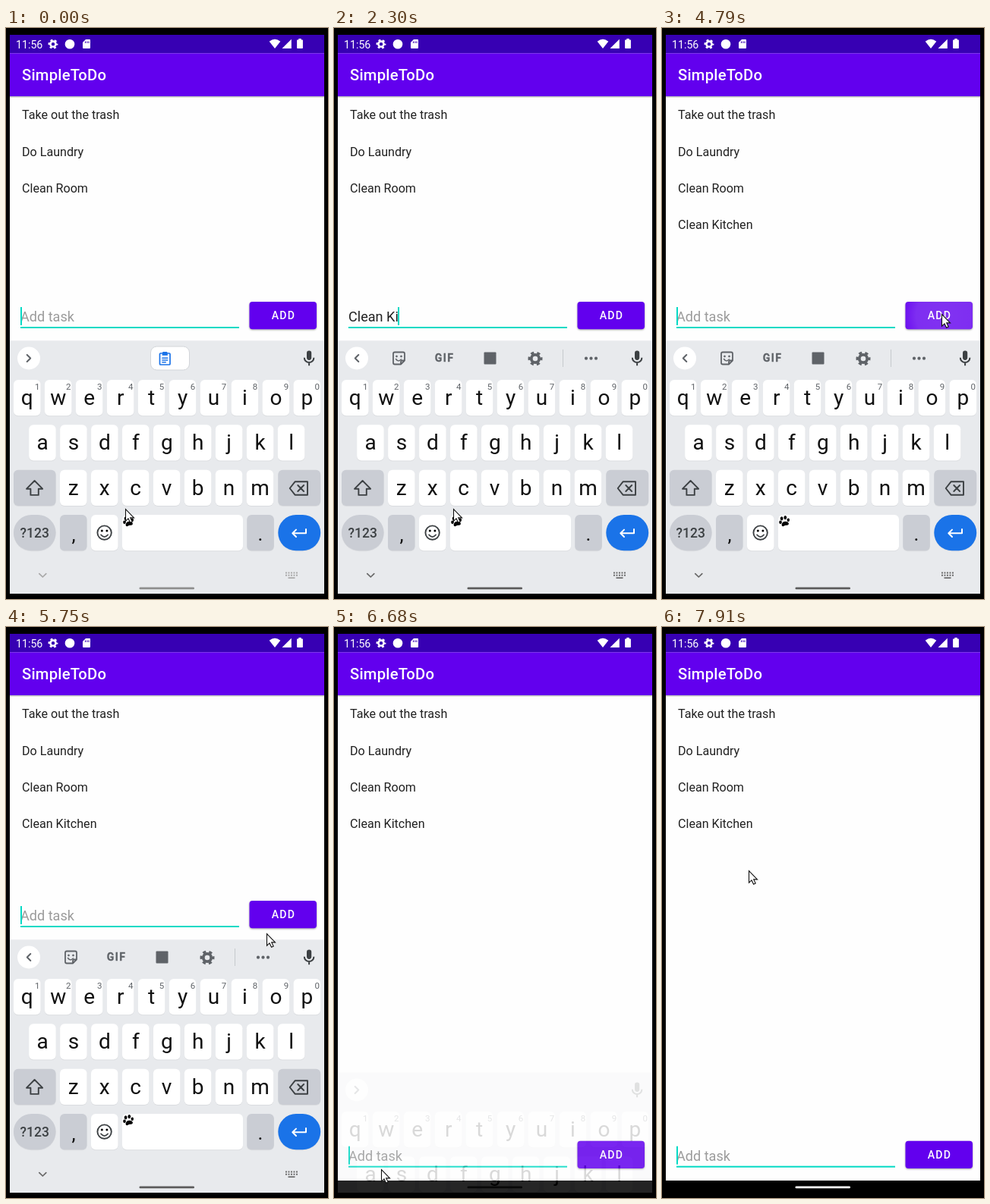
Animation, 424 px wide and 753 px high, one loop 8000 ms. Source, as an HTML page:

```html
<!DOCTYPE html>
<html lang="en">
<head>
<meta charset="utf-8">
<title>To-do list</title>
<style>
html, body { margin: 0; width: 100%; height: 100%; overflow: hidden; background: #000; }
svg { display: block; width: 100%; height: 100%; font-family: Roboto, sans-serif; }
text { white-space: pre; }
.line { fill: none; stroke-linecap: round; stroke-linejoin: round; }
.mid { text-anchor: middle; }
</style>
</head>
<body>
<svg id="stage" viewBox="0 0 424 753">
  <defs>
    <clipPath id="screen"><rect x="5" y="9" width="414" height="737"/></clipPath>
    <clipPath id="btn"><rect x="320.5" y="361" width="88.5" height="36.3" rx="4"/></clipPath>
    <radialGradient id="glow">
      <stop offset="0" stop-color="#fff"/><stop offset=".6" stop-color="#fff" stop-opacity=".9"/>
      <stop offset="1" stop-color="#fff" stop-opacity="0"/>
    </radialGradient>
    <linearGradient id="shade" x2="0" y2="1">
      <stop offset="0" stop-opacity=".3"/><stop offset="1" stop-opacity="0"/>
    </linearGradient>
    <g id="gear" fill="none">
      <circle r="5.2" stroke-width="3.8"/>
      <circle r="7.8" stroke-width="3.4" stroke-dasharray="4.1 4.07" stroke-dashoffset="2"/>
    </g>
  </defs>
  <rect width="424" height="753"/>
  <g clip-path="url(#screen)">
    <rect x="5" y="9" width="414" height="737" fill="#fefefe"/>
    <rect x="5" y="90" width="414" height="2.5" fill="url(#shade)"/>
    <rect x="5" y="9" width="414" height="24.3" fill="#3700b3"/>
    <rect x="5" y="33.3" width="414" height="56.7" fill="#6200ee"/>
    <g fill="#fff">
      <text x="13" y="26.5" font-size="14.2">11:56</text>
      <use href="#gear" stroke="#fff" transform="translate(62 21.2) scale(.68)"/>
      <circle cx="84" cy="21.2" r="6.3"/>
      <path d="M105 15h5q1 0 1 1v10q0 1-1 1h-8q-1 0-1-1v-7z"/>
      <path d="M104.5 17.5v2.5M106.8 17.5v2.5M109 17.5v2.5" stroke="#3700b3"/>
      <path d="M354 27l-7.3-9.2q7.3-6 14.6 0z"/>
      <path d="M363.5 27h12.3V14.8z"/>
      <path d="M385.3 14h3.4v1.4h1.4q.8 0 .8.8v10q0 .8-.8.8h-6.2q-.8 0-.8-.8v-10q0-.8.8-.8h1.4z"/>
      <text x="21" y="69.3" font-size="20.2" font-weight="500" letter-spacing=".25">SimpleToDo</text>
    </g>
    <g id="list" font-size="16.1" fill="#212121"></g>
    <rect id="navbar" x="5" y="730" width="414" height="16"/>
    <g id="row">
      <text id="field" x="19" y="387.2" font-size="18.1"></text>
      <rect x="19" y="394" width="288" height="2" fill="#03dac5"/>
      <rect id="caret" y="368" width="2" height="24" fill="#03dac5"/>
      <rect x="320.5" y="361" width="88.5" height="36.3" rx="4" fill="#6200ee" style="filter:drop-shadow(0 1.5px 1.2px rgba(0,0,0,.35))"/>
      <g clip-path="url(#btn)"><circle id="ripple" cx="372" cy="379" fill="url(#glow)"/></g>
      <text x="365.5" y="384.3" class="mid" font-size="14.1" font-weight="500" letter-spacing="1.26" fill="#fff">ADD</text>
    </g>
    <g id="keyboard">
      <rect x="5" y="412.3" width="414" height="345" fill="#e8eaed"/>
      <circle cx="30" cy="435.5" r="15" fill="#fff"/>
      <path id="toggle" class="line" stroke="#5f6368" stroke-width="2"/>
      <g id="chip">
        <rect x="190.5" y="420" width="51" height="31" rx="8" fill="#fff" stroke="#d2d5d9"/>
        <g class="line" stroke="#1a73e8" stroke-width="1.7">
          <rect x="202.5" y="429" width="13.5" height="15" rx="1"/>
          <path d="M206 431h6.5M205.8 435.2h7M205.8 438h7M205.8 440.8h4.5" stroke-width="1.4"/>
        </g>
        <rect x="206" y="427" width="6.5" height="4.5" rx="1" fill="#1a73e8"/>
      </g>
      <g id="tools" fill="#5f6368" stroke="#5f6368">
        <path class="line" stroke-width="1.8" d="M80 427.5h11q2 0 2 2v9l-5 5h-8q-2 0-2-2v-12q0-2 2-2zM93 438.5h-3q-2 0-2 2v3"/>
        <path class="line" stroke-width="1.5" d="M81.5 436.5q3 4.5 7 .5"/>
        <circle cx="82.5" cy="433" r=".9"/><circle cx="88.5" cy="433" r=".9"/>
        <text x="145.5" y="440.2" class="mid" font-size="14" font-weight="700" letter-spacing="1.4" stroke-width=".3">GIF</text>
        <rect x="197.5" y="427.5" width="16" height="16" rx="1" stroke="none"/>
        <use href="#gear" transform="translate(265 436)"/>
        <path d="M301.5 424v23" stroke="#c6c9cd"/>
        <g stroke="none"><circle cx="332" cy="435.7" r="2.1"/><circle cx="338.5" cy="435.7" r="2.1"/><circle cx="345" cy="435.7" r="2.1"/></g>
      </g>
      <rect x="396" y="425.5" width="6.2" height="12.4" rx="3.1" fill="#3c4043"/>
      <path class="line" style="stroke-linecap:butt" d="M392.8 434.8a6.3 6.3 0 0 0 12.6 0M399.1 441v4.3" stroke="#3c4043" stroke-width="2"/>
      <g id="keys"></g>
      <g class="line" stroke="#3c4043" stroke-width="1.9">
        <path d="M37.6 597l-10.5 10.7h5.3v8.2h10.4v-8.2h5.3z"/>
        <path d="M380.5 598.3H397v17.4h-16.5l-6.8-8.7zM384.3 603l7.8 8M392.1 603l-7.8 8"/>
        <circle cx="129.6" cy="665.6" r="9.2"/>
        <path d="M125 668.3q4.6 5.6 9.2 0" stroke-width="1.7"/>
      </g>
      <circle cx="126.3" cy="663" r="1.5"/><circle cx="132.9" cy="663" r="1.5"/>
      <path class="line" stroke="#fff" stroke-width="2" d="M395 661v5.3h-17.5M382 661.6l-4.7 4.7 4.7 4.7"/>
      <g id="paw">
        <path d="M157.5 655q1-4.5 5-4.3 4.5.3 4.4 3.4-.4 2-3 1.6-2.200-.2-3.200 1-2.800 1.500-3.200-1.700z"/>
        <ellipse cx="156" cy="651.8" rx="1.8" ry="2.2"/><ellipse cx="157.6" cy="646.8" rx="1.9" ry="2.600"/>
        <ellipse cx="162.3" cy="645.6" rx="1.9" ry="2.600"/><ellipse cx="166.300" cy="648.700" rx="1.700" ry="2.200"/>
      </g>
      <rect id="press" x="10" y="698" width="76" height="48" rx="24" fill="#000"/>
      <g id="nav">
        <path class="line" d="M43.800 719.600l4.500 4.400 4.500-4.400" stroke-width="1.700"/>
        <path d="M368 718.500h16M368 721.700h16" stroke-width="1.900" stroke-dasharray="1.900 1.600"/>
        <path d="M371.500 725.200h9" stroke-width="1.700"/>
      </g>
    </g>
    <rect id="pill" x="175.500" y="737.500" width="72.500" height="2.700" rx="1.300"/>
  </g>
  <path id="mouse" d="M.5 .5V16.200L4 12.900 6.600 18.300 9.200 17.100 6.700 11.900H11.500Z" fill="#fff" stroke="#111" stroke-width="1.100"/>
</svg>
<script>
const $ = id => document.getElementById(id);
const LOOP = 8000, TASK = 'Clean Kitchen', HINT = 'Add task';

// the screen refreshes in bursts: [first, last, count]
const bursts = [
  [0, 0, 1], [120, 120, 1], [400, 690, 3], [1060, 1060, 1], [1340, 2300, 8],
  [2450, 2840, 4], [3400, 4120, 6], [4400, 4400, 1], [4670, 5630, 8],
  [5750, 6680, 8], [6800, 7490, 6], [7760, 7910, 2]
];
const steps = bursts.flatMap(([a, b, n]) => Array.from({ length: n }, (_, i) =>
  i === 0 ? a : i === n - 1 ? b : a + (b - a) * i / (n - 1) - 18));

const caretOff = [[120, 520], [1060, 1340], [3400, 3900], [4400, 4780], [5000, 5470], [7000, 7480]];
const route = [
  [3390, 157, 634], [3400, 69, 562], [4120, 368, 377], [5475, 368, 377], [5630, 364, 382],
  [6390, 53, 717], [6530, 53, 717], [6680, 62, 715], [7490, 112, 425], [7760, 113, 372], [7910, 114, 321]
];

const mix = (a, b, k) => a + (b - a) * k;
const ramp = (t, a, b) => Math.min(1, Math.max(0, (t - a) / (b - a)));
const within = (t, a, b) => t >= a && t < b;
const show = (id, on) => $(id).setAttribute('display', on ? 'inline' : 'none');
const gray = v => { v = Math.round(v); return `rgb(${v},${v},${v})`; };

function buildKeys() {
  const rows = [['qwertyuiop', 10, 464], ['asdfghjkl', 30.2, 523.3], ['zxcvbnm', 71, 582.7]];
  const key = (x, y, w, fill = '#fff', r = 6) =>
    `<rect x="${x}" y="${y + 1}" width="${w}" height="47.300" rx="${r}" fill="#000" opacity=".06"/>` +
    `<rect x="${x}" y="${y}" width="${w}" height="47.300" rx="${r}" fill="${fill}"/>`;
  const label = (s, x, y, size, fill = '#111', weight = 400) =>
    `<text class="mid" x="${x}" y="${y}" font-size="${size}" fill="${fill}" font-weight="${weight}">${s}</text>`;
  const soft = '#cacdd4';
  let out = '';
  rows.forEach(([letters, x0, y], r) => [...letters].forEach((c, i) => {
    const x = x0 + i * 40.95;
    out += key(x, y, 35.5) + label(c, x + 17.8, y + 33, 28);
    if (!r) out += label((i + 1) % 10, x + 31.3, y + 12.7, 11.5, '#5f6368');
  }));
  out += key(10, 582.7, 55.6, soft) + key(358.300, 582.7, 55.900, soft);
  out += key(10, 642, 55.6, soft, 23.6) + key(71, 642, 35.5, soft) + key(112, 642, 35.5);
  out += key(153, 642, 159) + key(317.300, 642, 35.5, soft) + key(358.300, 642, 55.900, '#1a73e8', 23.6);
  out += label('?123', 37.700, 672.300, 17.500, '#3c4043', 500);
  out += label(',', 89, 677, 26) + label('.', 335, 676, 26);
  $('keys').innerHTML = out;
}

function buildList() {
  $('list').innerHTML = ['Take out the trash', 'Do Laundry', 'Clean Room', TASK].map((s, i) =>
    `<text x="21" y="${120.200 + i * 48.350}">${s}</text>`).join('');
}

function typedCount(s) {
  if (s < 1340 || s >= 4780) return 0;
  if (s <= 2300) return 1 + Math.round((s - 1340) / 137);
  return 9 + Math.round(ramp(s, 2450, 2840) * 4);
}

function mouseAt(s) {
  if (s <= route[0][0]) return route[0].slice(1);
  const i = route.findIndex(p => p[0] > s);
  if (i < 0) return route[route.length - 1].slice(1);
  const [a, x, y] = route[i - 1], [b, u, v] = route[i];
  let k = ramp(s, a, b);
  if (b - a > 700) k = k * k * (3 - 2 * k);
  return [mix(x, u, k), mix(y, v, k)];
}

function draw(t) {
  const s = steps.filter(v => v <= t).pop();
  const closing = within(s, 6600, 6800), open = s < 6600;

  // input row
  const text = TASK.slice(0, typedCount(s)), field = $('field');
  field.textContent = text || HINT;
  field.setAttribute('fill', text ? '#212121' : '#9b9b9b');
  const w = text ? field.getComputedTextLength() : 0;
  $('caret').setAttribute('x', Math.floor(19 + w));
  show('caret', !caretOff.some(([a, b]) => within(s, a, b)));
  show('row', !within(s, 6500, 6600));
  $('row').setAttribute('transform', `translate(0 ${open ? 0 : 316.700})`);
  $('list').lastChild.setAttribute('display', s >= 4780 ? 'inline' : 'none');
  $('ripple').setAttribute('r', mix(20, 62, ramp(s, 4670, 4789)));
  $('ripple').setAttribute('opacity', s < 4670 ? 0 : .2 * (1 - ramp(s, 4900, 5300)));

  // keyboard
  const wide = within(s, 1860, 6600);
  show('keyboard', open || closing);
  $('keyboard').setAttribute('transform', `translate(0 ${closing ? 175 : 0})`);
  $('keyboard').setAttribute('opacity', closing ? .15 : 1);
  show('chip', s < 1860);
  show('tools', wide);
  $('toggle').setAttribute('d', wide ? 'M32.300 431l-4.500 4.500 4.500 4.500' : 'M27.700 431l4.500 4.500-4.500 4.500');
  $('press').setAttribute('opacity', .11 * ramp(s, 6300, 6520));

  // system bar
  const dark = ramp(s, 300, 690);
  $('nav').setAttribute('stroke', gray(mix(168, 104, dark)));
  show('navbar', !open);
  $('pill').setAttribute('fill', gray(open ? mix(142, 92, dark) : mix(8, 255, ramp(s, 7610, 7910))));

  $('mouse').setAttribute('transform', `translate(${mouseAt(s).map(Math.round).join(' ')})`);
}

function tick() {
  draw(performance.now() % LOOP);
  requestAnimationFrame(tick);
}

buildKeys();
buildList();
tick();
</script>
</body>
</html>
```
